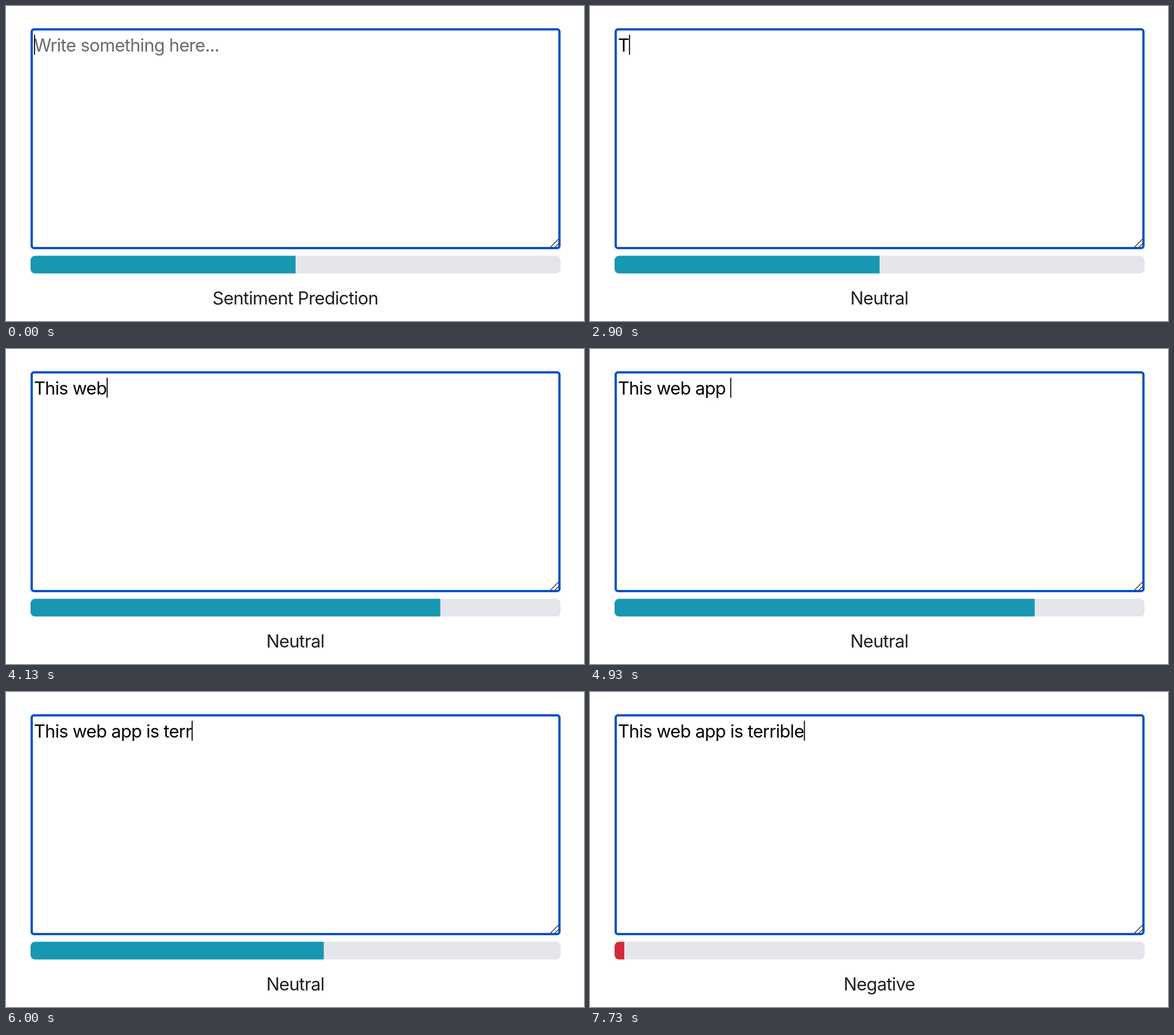
Write an HTML page that moves like this. It is 1012 px wide and 553 px high and loops after 8000 ms.

```html
<!DOCTYPE html>
<html lang="en">
<head>
<meta charset="utf-8">
<title>Sentiment Prediction</title>
<style>
  html, body { margin: 0; width: 100%; height: 100%; overflow: hidden; background: #fff; }
  svg { display: block; }
  text {
    font: 400 31px Inter, "Open Sans", sans-serif;
    font-optical-sizing: none;
    letter-spacing: -0.7px;
    white-space: pre;
  }
</style>
</head>
<body>
<svg width="1012" height="553" viewBox="0 0 1012 553">
  <clipPath id="round"><rect x="43" y="438.5" width="928" height="31" rx="8"/></clipPath>
  <rect x="45" y="41" width="924" height="384" rx="4" fill="#fff" stroke="#0453c4" stroke-width="4"/>
  <path d="M953 423.5L967.5 409M961 423.5L967.5 417" stroke="#444" stroke-width="1.6" fill="none"/>
  <g clip-path="url(#round)">
    <rect x="43" y="438" width="928" height="32" fill="#e5e6eb"/>
    <rect id="bar" x="43" y="438" height="32"/>
  </g>
  <text id="input" x="49" y="80"></text>
  <rect id="caret" y="50.5" width="1.8" height="35"/>
  <text id="label" x="506.5" y="524" text-anchor="middle" fill="#1e1f20"></text>
</svg>
<script>
const LOOP = 8000, EASE_MS = 600, BLINK_MS = 500;
const PHRASE = "This web app is terrible";
// Time of each keystroke
const KEYS = [2840, 2990, 3160, 3380, 3620, 3700, 3860, 4050, 4200, 4500, 4670, 4800,
  4930, 5070, 5200, 5330, 5460, 5620, 5780, 5930, 6170, 6330, 6530, 6730];
// Score changes: time, right edge of the bar
const SCORES = [[2980, 565], [3700, 771], [4500, 779], [5260, 700], [5500, 560], [5800, 530], [6730, 60]];
const [bar, input, caret, label] = ["bar", "input", "caret", "label"].map(id => document.getElementById(id));

// cubic-bezier(.25, .1, .25, 1)
function ease(x) {
  if (x >= 1) return 1;
  const curve = (a, b, s) => 3 * a * s * (1 - s) ** 2 + 3 * b * s * s * (1 - s) + s ** 3;
  let lo = 0, hi = 1;
  for (let i = 0; i < 24; i++) {
    const mid = (lo + hi) / 2;
    if (curve(.25, .25, mid) < x) lo = mid; else hi = mid;
  }
  return curve(.1, 1, lo);
}

// Each new score starts a transition from wherever the bar is
function barEdge(t) {
  let edge = 507;
  SCORES.forEach(([start, target], i) => {
    if (t < start) return;
    const end = Math.min(t, SCORES[i + 1]?.[0] ?? LOOP);
    edge += (target - edge) * ease((end - start) / EASE_MS);
  });
  return edge;
}

function draw(now) {
  const t = now % LOOP;
  const typed = KEYS.filter(k => k <= t).length;
  const negative = typed === PHRASE.length;

  input.textContent = typed ? PHRASE.slice(0, typed) : "Write something here...";
  input.setAttribute("fill", typed ? "#000" : "#6a6a6a");
  label.textContent = negative ? "Negative" : typed ? "Neutral" : "Sentiment Prediction";
  bar.setAttribute("width", barEdge(t) - 43);
  bar.setAttribute("fill", negative ? "#d4293d" : "#1897b2");

  const lastKey = typed ? KEYS[typed - 1] : -200;
  caret.setAttribute("x", 49 + (typed ? input.getComputedTextLength() : 0));
  caret.setAttribute("visibility", Math.floor((t - lastKey) / BLINK_MS) % 2 ? "hidden" : "visible");
}

const begin = performance.now();
function tick() {
  draw(performance.now() - begin);
  requestAnimationFrame(tick);
}
tick();
</script>
</body>
</html>
```
